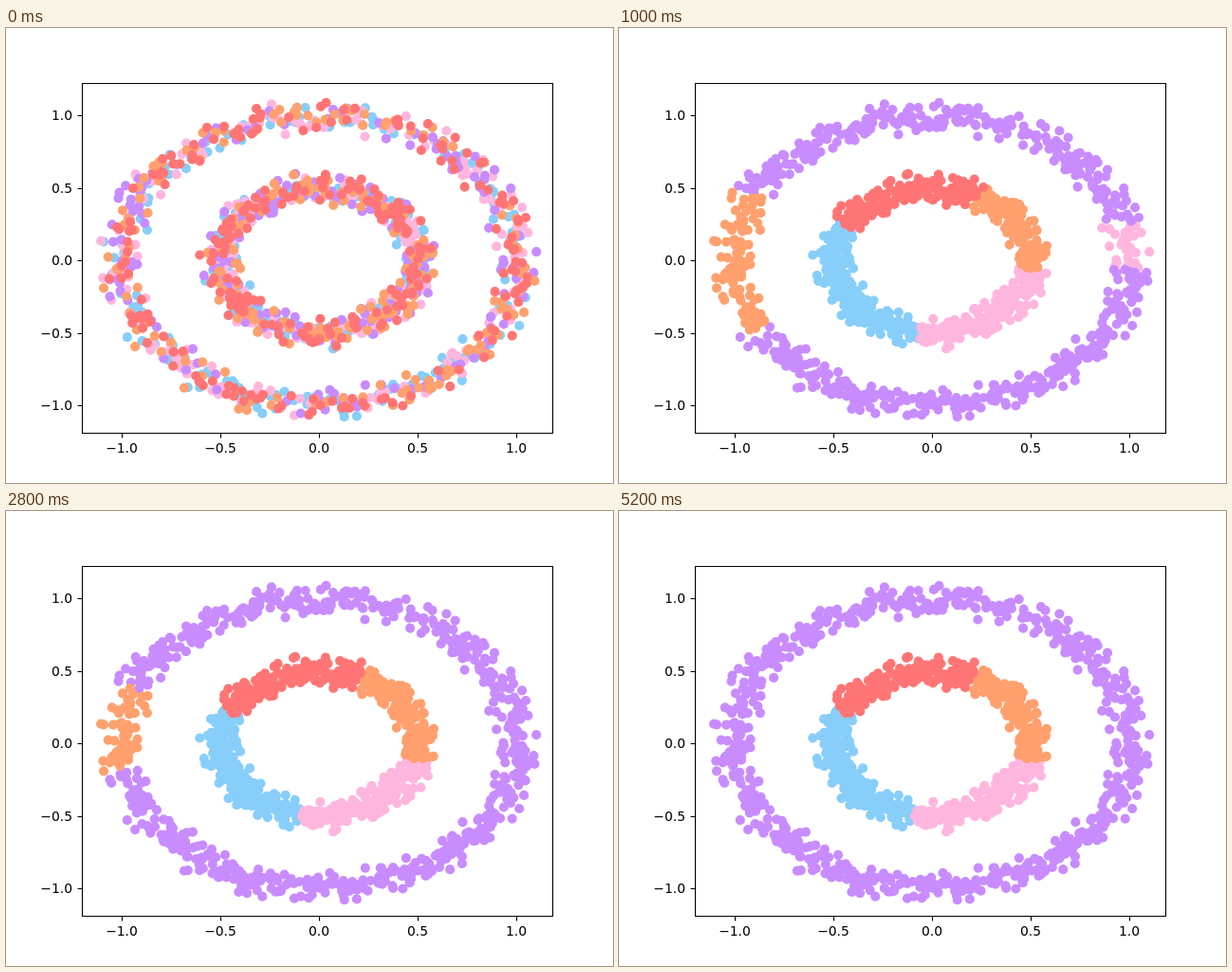
An HTML page that plays this animation: 640 by 480 pixels, repeating every 5400 ms.

```html
<!DOCTYPE html>
<html lang="en">
<head>
<meta charset="utf-8">
<title>Clusters on two rings</title>
<style>
  html, body { margin: 0; width: 100%; height: 100%; overflow: hidden; background: #fff; }
  svg { display: block; width: 640px; height: 480px; }
  text { font: 13.89px "DejaVu Sans", sans-serif; }
  .dots path { fill: none; stroke-width: 10.2; stroke-linecap: round; }
  .axes { fill: none; stroke: #000; stroke-width: 1.11; }
</style>
</head>
<body>
<svg viewBox="0 0 640 480">
  <g class="dots"></g>
  <path class="axes"></path>
  <g class="labels"></g>
</svg>
<script>
const STEP = 200, STEPS = 27, DOTS = 720, SPREAD = .05;
const BLUE = 0, PINK = 1, PURPLE = 2, ORANGE = 3, RED = 4;
const COLOURS = ['#87cefa', '#ffb6de', '#c88cff', '#ffa06e', '#ff7575']; // painted in this order

const toX = x => 330 + 208 * x;
const toY = y => 245.2 - 152.8 * y;
const DEG = 180 / Math.PI;

// Passing groups: colour, from degree, to degree, step at which the group is gone
const outerGroups = [
  [RED, -11, -4, 4], [PINK, -4, 17, 10], [BLUE, 17, 34, 4],
  [RED, 84, 97, 4], [PINK, 97, 104, 4], [ORANGE, 104, 108, 4],
  [ORANGE, 122, 138, 4], [ORANGE, 153, 210, 18],
  [ORANGE, 233, 249, 4], [PINK, 249, 258, 4]];
const innerGroups = [
  [PURPLE, 124, 139, 4], [ORANGE, 286, 320, 4], [RED, 320, 336, 4], [BLUE, 336, 357, 4]];

// Lasting groups: colour, first and settled degree of the edge where each begins
const innerEdges = [[ORANGE, 10, -13], [RED, 56, 65], [BLUE, 140, 155], [PINK, 275, 258.5]];

let seed = 20;
function random() {
  seed = (seed + 0x6d2b79f5) | 0;
  let t = Math.imul(seed ^ (seed >>> 15), 1 | seed);
  t = (t + Math.imul(t ^ (t >>> 7), 61 | t)) ^ t;
  return ((t ^ (t >>> 14)) >>> 0) / 4294967296;
}
const noise = () =>
  SPREAD * Math.sqrt(-2 * Math.log(1 - random())) * Math.cos(2 * Math.PI * random());

function makeRing(radius) {
  return Array.from({ length: DOTS }, (_, i) => {
    const a = 2 * Math.PI * i / DOTS;
    let x, y;
    do {
      x = radius * Math.cos(a) + noise();
      y = radius * Math.sin(a) + noise();
    } while (Math.abs(Math.hypot(x, y) - radius) > 2.3 * SPREAD);
    return {
      angle: Math.atan2(y, x) * DEG,
      path: `M${toX(x).toFixed(1)} ${toY(y).toFixed(1)}h0`,
      first: Math.floor(random() * COLOURS.length)
    };
  });
}

const outer = makeRing(1), inner = makeRing(.5);

// A passing group keeps its width at first, then closes ever faster
function shrink([colour, from, to, end], step) {
  const t = Math.min(1, (step - 1) / (end - 1));
  const size = (1 - t * t) ** .6;
  const focus = from + .2 * (to - from);
  return [colour, focus + (from - focus) * size, focus + (to - focus) * size];
}

function settle(step) {
  const k = Math.exp((1 - step) / 3);
  const edges = innerEdges.map(([, first, last]) => last + (first - last) * k);
  return innerEdges.map(([colour], i) => [colour, edges[i], edges[i + 1] ?? edges[0] + 360]);
}

const within = (angle, from, to) => ((angle - from) % 360 + 360) % 360 < to - from;

function draw(step) {
  const paths = COLOURS.map(() => '');
  const paint = (dots, groups) => {
    for (const dot of dots) {
      const group = groups.findLast(([, from, to]) => within(dot.angle, from, to));
      paths[step ? group[0] : dot.first] += dot.path;
    }
  };
  const passing = groups => groups.map(group => shrink(group, Math.max(1, step)));
  paint(outer, [[PURPLE, 0, 361], ...passing(outerGroups)]);
  paint(inner, [[PINK, 0, 361], ...settle(Math.max(1, step)), ...passing(innerGroups)]);
  layers.forEach((layer, i) => layer.setAttribute('d', paths[i]));
}

function make(parent, name, attributes) {
  const node = document.createElementNS('http://www.w3.org/2000/svg', name);
  for (const key in attributes) node.setAttribute(key, attributes[key]);
  return document.querySelector(parent).appendChild(node);
}

const layers = COLOURS.map(stroke => make('.dots', 'path', { stroke }));

let axes = 'M80.5 58.5H576.5V427.5H80.5Z';
for (let v = -1; v <= 1; v += .5) {
  const x = Math.round(toX(v)), y = Math.round(toY(v));
  const label = v.toFixed(1).replace('-', '\u2212');
  axes += `M${x + .5} 427.5v5M80.5 ${y + .5}h-5`;
  make('.labels', 'text', { x, y: 448, 'text-anchor': 'middle' }).textContent = label;
  make('.labels', 'text', { x: 70, y: y + 5, 'text-anchor': 'end' }).textContent = label;
}
document.querySelector('.axes').setAttribute('d', axes);

const start = performance.now();
let shown = -1;
function tick() {
  const step = Math.floor((performance.now() - start) / STEP) % STEPS;
  if (step !== shown) draw(shown = step);
  requestAnimationFrame(tick);
}
tick();
</script>
</body>
</html>
```
